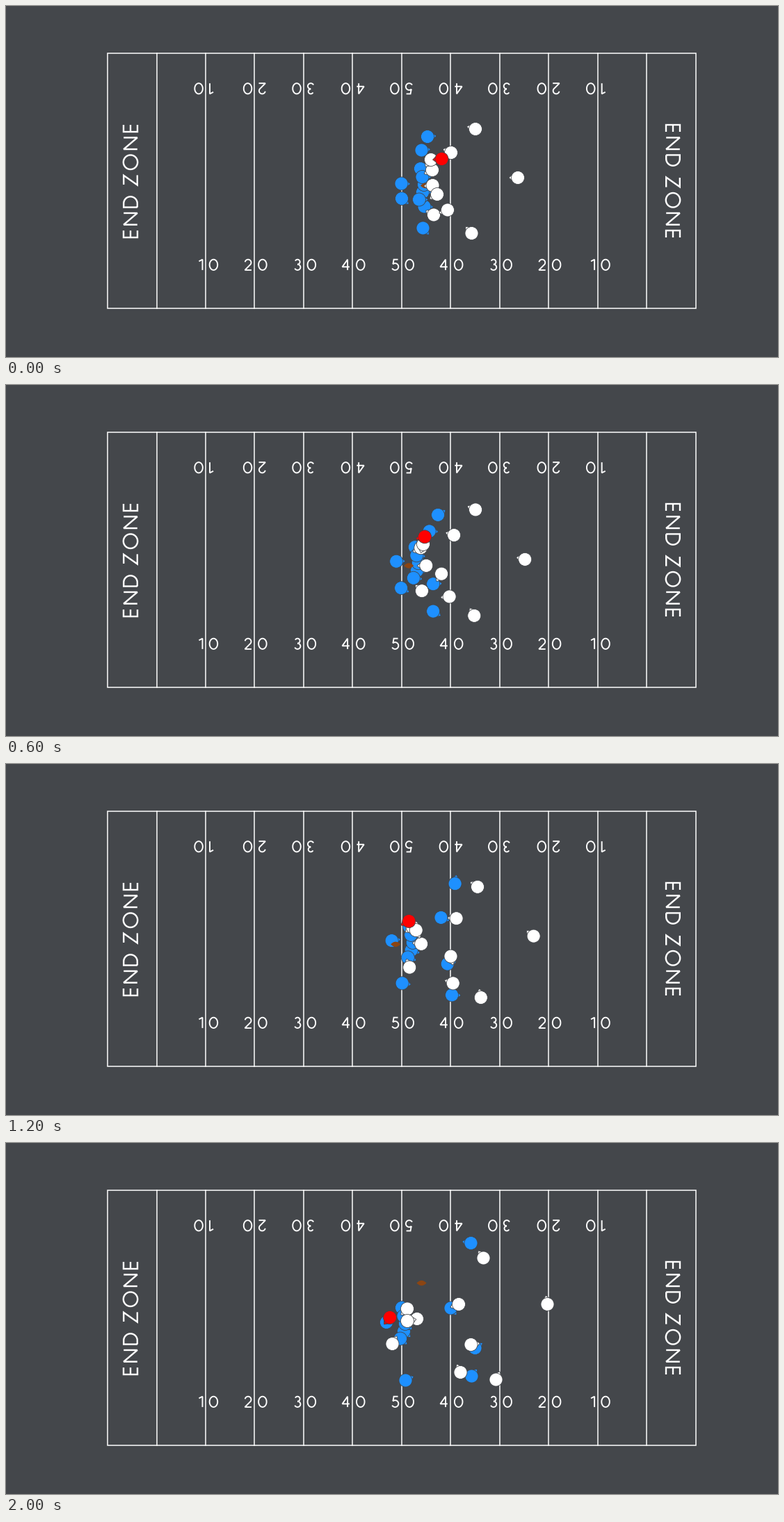
Recreate the animation shown at these times as a matplotlib script. Size 1110x505 px, loop 2.1 s.

```python
import numpy as np
import matplotlib.pyplot as plt
from matplotlib.animation import FuncAnimation
from matplotlib.patches import Circle, Polygon, Rectangle

W, H, DPI = 1110, 505, 100
FRAMES, STEP = 21, 100
PX = 72 / DPI                       # one pixel in points
GRASS, EDGE = "#44474b", "#414448"
BLUE, WHITE, RED, BROWN = "#1e90ff", "#ffffff", "#ff0000", "#8b4513"

fig = plt.figure(figsize=(W / DPI, H / DPI), dpi=DPI, facecolor=GRASS)
ax = fig.add_axes([0, 0, 1, 1])
ax.set_xlim(0, W)
ax.set_ylim(H, 0)
ax.axis("off")


# ---- lettering: thin geometric strokes in a box of height 1, y up ----

def arc(cx, cy, rx, ry, start, stop):
    a = np.radians(np.linspace(start, stop, 50))
    return list(zip(cx + rx * np.cos(a), cy + ry * np.sin(a)))


GLYPHS = {                          # width, strokes
    "E": (.52, [[(.52, 1), (0, 1), (0, 0), (.52, 0)], [(0, .52), (.5, .52)]]),
    "N": (.85, [[(0, 0), (0, 1), (.85, 0), (.85, 1)]]),
    "D": (.78, [[(0, 0), (0, 1), (.28, 1)] + arc(.28, .5, .5, .5, 90, -90) + [(0, 0)]]),
    "Z": (.72, [[(.03, 1), (.7, 1), (0, 0), (.72, 0)]]),
    "O": (1.05, [arc(.525, .5, .525, .52, 0, 360)]),
    " ": (0, []),
    "0": (.76, [arc(.38, .5, .38, .5, 0, 360)]),
    "1": (.33, [[(0, .83), (.33, 1), (.33, 0)]]),
    "2": (.62, [arc(.3, .71, .29, .29, 170, -38) + [(0, 0), (.62, 0)]]),
    "3": (.54, [arc(.26, .77, .23, .23, 155, -90) + arc(.26, .27, .28, .27, 90, -155)]),
    "4": (.68, [[(.5, 0), (.5, 1), (0, .3), (.68, .3)]]),
    "5": (.6, [[(.55, 1), (.16, 1), (.08, .56)] + arc(.28, .32, .32, .32, 125, -150)]),
}


def label(text, x, y, size, gap, angle, align, weight):
    """Write text around (x, y); align is the share of its length before x."""
    total = sum(GLYPHS[c][0] for c in text) + gap * (len(text) - 1)
    ca, sa = np.cos(np.radians(angle)), np.sin(np.radians(angle))
    pen = -align * total
    for c in text:
        width, strokes = GLYPHS[c]
        for s in strokes:
            u, v = (np.array(s) + (pen, -.5)).T * size
            ax.plot(x + u * ca - v * sa, y - u * sa - v * ca, color=WHITE,
                    lw=weight * PX, solid_joinstyle="miter",
                    solid_capstyle="butt", zorder=1)
        pen += width + gap


# ---- field ----

LEFT, TOP, BOTTOM, GAP = 146.1, 68, 435, 70.455
ax.add_patch(Rectangle((LEFT, TOP), 12 * GAP, BOTTOM - TOP, fill=False,
                       ec=WHITE, lw=1.5 * PX, zorder=1))
for k in range(1, 12):
    x = LEFT + k * GAP
    ax.plot([x, x], [TOP, BOTTOM], color=WHITE, lw=1.5 * PX, zorder=1)
    if 2 <= k <= 10:
        yards = str(10 * min(k - 1, 11 - k))
        label(yards, x + 17.2, 372.3, 15.2, .67, 0, 1, 1.9)
        label(yards, x - 15.7, 118.8, 15.2, .67, 180, 1, 1.9)
for x, angle in ((179, 90), (959, -90)):
    label("END ZONE", x, 252, 19.6, .428, angle, .5, 2.4)
ax.plot([0, W], [H - .5, H - .5], color="#36393c", lw=PX)


# ---- players ----

HEAD = np.array([(13, 0), (3, 8.6), (3, -8.6)])


def mix(a, b, s):
    return np.asarray(a) * (1 - s) + np.asarray(b) * s


class Player:
    """Runs from start to end along a bowed path while turning (degrees)."""

    def __init__(self, color, start, end, bow=(0, 0), turn=(0, 0), burst=0):
        self.start, self.end, self.bow = start, end, np.array(bow)
        self.turn, self.burst = turn, burst
        style = dict(fc=color, ec=EDGE, lw=.8 * PX, zorder=3)
        self.nose = ax.add_patch(Polygon(HEAD, closed=True, **style))
        self.body = ax.add_patch(Circle((0, 0), 9.5, **style))

    def move(self, s):
        a = np.radians(mix(*self.turn, s ** 1.5))
        s = mix(s, s * s * (3 - 2 * s), self.burst)
        pos = mix(self.start, self.end, s) + 4 * s * (1 - s) * self.bow
        spin = np.array([(np.cos(a), np.sin(a)), (-np.sin(a), np.cos(a))])
        self.nose.set_xy(HEAD @ spin + pos)
        self.body.center = pos


# receivers and the back
players = [
    Player(BLUE, (606, 188), (668.5, 144), (0, 13), (-5, -170), .7),
    Player(BLUE, (597.5, 207.5), (639.5, 237.5), (1.5, -6), (-6, 50), .7),
    Player(BLUE, (601.5, 288.5), (674.5, 295), (-11, -5), (3, -34)),
    Player(BLUE, (599.5, 319.5), (669.5, 335.5), (-3, 3), (48, -52), .7),
    Player(BLUE, (569, 277), (574.5, 341.5), (-3, -2), (38, -26), .5),
]
# the line is pushed back as one
for x, y in ((596, 234), (599, 268), (601, 257), (598.5, 246), (594, 278.5)):
    players.append(Player(BLUE, (x, y), (x - 27, y + 3), (0, -2), (0, 40)))
players.append(Player(BLUE, (568.5, 255.5), (547, 258), (-1, -3), (2, -20)))

u = np.linspace(-1, 1, 21)
bulge = 3.7 * (1 - u ** 2)
LENS = np.column_stack([7 * np.r_[u, -u], np.r_[bulge, -bulge]])
ball = ax.add_patch(Polygon(LENS, closed=True, fc=BROWN, ec="none", zorder=3))

players += [
    # pass rush
    Player(WHITE, (613, 236), (577, 238.5), (-7, -3), (155, 135)),
    Player(WHITE, (613.5, 258), (591, 253), (-3, 4), (175, 200)),
    Player(WHITE, (611, 221), (577, 256), (-1, -3), (128, -10)),
    Player(WHITE, (615, 300.5), (555.5, 289), (1, -1), (208, 300)),
    # coverage
    Player(WHITE, (620, 271), (668.5, 290), (-10, -6), (149, -8)),
    Player(WHITE, (635, 293.5), (653.5, 330), (-3.5, 0), (160, 246)),
    Player(WHITE, (669.5, 327), (704.5, 340.5), (-8, 1), (228, 295)),
    Player(WHITE, (675, 177), (686.5, 165.5), (-4, 7), (197, 235)),
    Player(WHITE, (736, 247), (778.5, 232), (-3, 10), (180, 260)),
    Player(WHITE, (640, 211), (651, 232), (1, -1.5), (204, 160)),
    Player(RED, (626.5, 220), (552, 251), (-2.5, -13), (175, 130)),
]

THROW = 1.5


def ball_at(t):
    """Carried back, easing to a stop, then thrown in a straight line."""
    u = min(t / THROW, 1)
    air = max(t - THROW, 0)
    return (603 - 50.5 * u * (1.3 - .3 * u) + 90 * air,
            258.5 + 1.5 * np.sin(np.pi * u) - 114 * air)


def update(i):
    for p in players:
        p.move(i / (FRAMES - 1))
    ball.set_xy(LENS + ball_at(i * STEP / 1000))
    return []


anim = FuncAnimation(fig, update, frames=FRAMES, interval=STEP,
                     init_func=lambda: update(0), repeat=True, repeat_delay=0)
plt.show()
```
